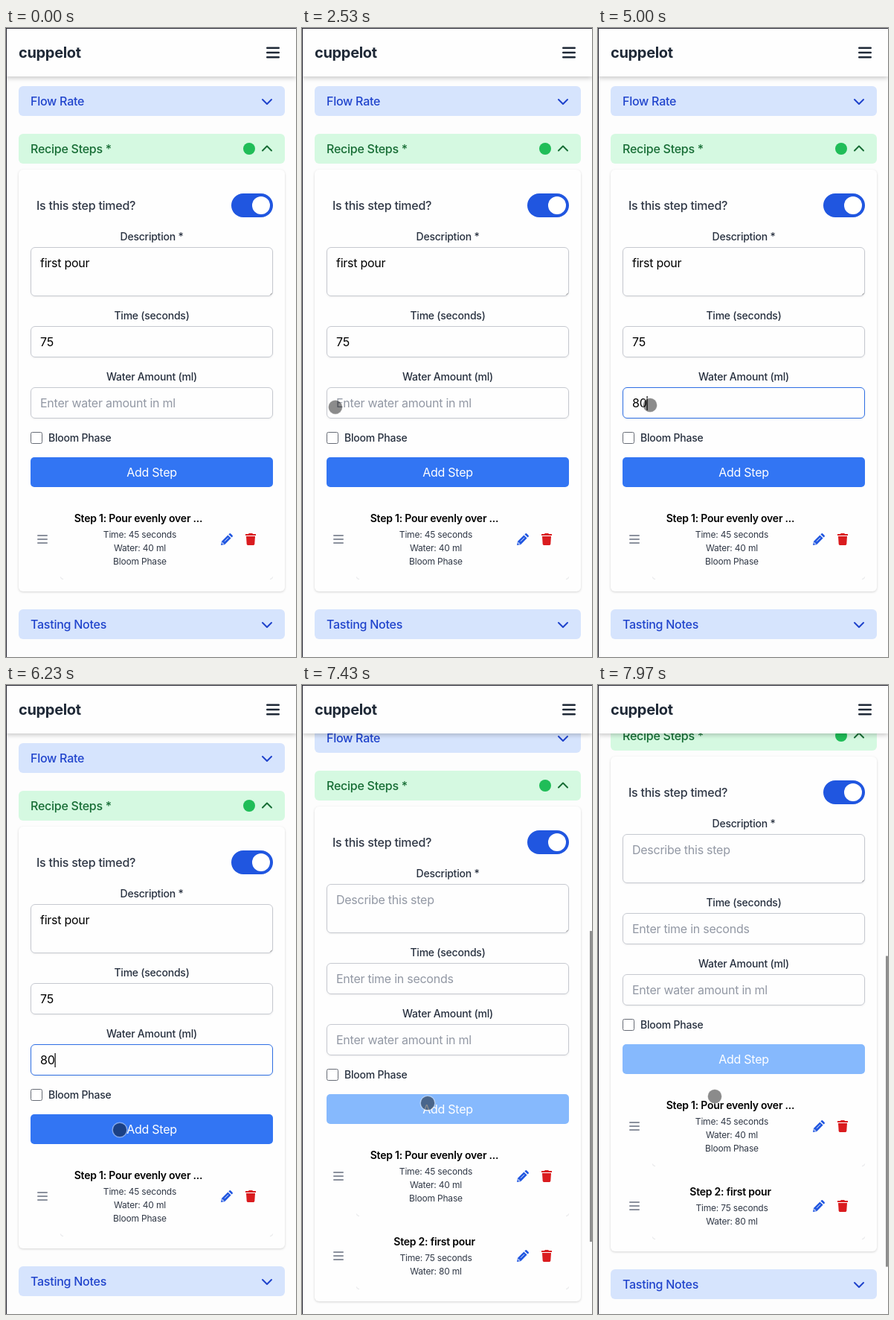
Animation, 390 px wide and 844 px high, one loop 8000 ms. Source, as an HTML page:

```html
<!DOCTYPE html>
<html lang="en">
<head>
<meta charset="utf-8">
<title>Recipe form</title>
<style>
  html, body { margin: 0; width: 100%; height: 100%; overflow: hidden; background: #fdfdfd; }
  svg { display: block; width: 390px; height: 844px; }
  text { font: 400 16px Inter, "Open Sans", sans-serif; letter-spacing: -.016em; fill: #000; white-space: pre; }
  .mid { text-anchor: middle; }
  .brand { font-size: 20px; font-weight: 700; fill: #1f2937; }
  .section { font-weight: 500; }
  .label { font-size: 14px; font-weight: 500; fill: #27303f; }
  .question { font-weight: 500; fill: #303846; }
  .title { font-size: 14px; font-weight: 600; }
  .detail { font-size: 12px; fill: #303846; }
  .hint { fill: #9298a4; }
  .stroke { fill: none; stroke-width: 2; stroke-linecap: round; stroke-linejoin: round; }
  .field { fill: #fefefe; stroke: #c6c9d0; filter: drop-shadow(0 1px 1px rgba(0,0,0,.06)); }
  .field.focus { stroke: #2f6fe4; }
  .card { fill: #fefefe; filter: drop-shadow(0 1px 1.5px rgba(0,0,0,.16)); }
  .header { fill: #fefefe; filter: drop-shadow(0 2px 3px rgba(0,0,0,.22)); }
</style>
</head>
<body>
<svg id="stage" viewBox="0 0 390 844"></svg>
<script>
const LOOP = 8000;
const FOCUS = 3400, TYPED = [4650, 4950], SUBMIT = 6450, SCROLL = 7150;

// Keyframes: time followed by values
const CURSOR = [[2300, -12, 520], [2500, 42, 509], [2800, 70, 506], [5350, 70, 506],
  [6050, 153, 597], [6800, 153, 597], [7150, 169, 561], [7430, 169, 561], [7700, 169, 558], [7970, 157, 552]];
const OFFSET = [[SCROLL, 0], [7430, 27], [7700, 52], [7970, 94], [8000, 99]];

const text = (x, y, cls, str, extra = '') => `<text x="${x}" y="${y}" class="${cls}" ${extra}>${str}</text>`;
const stroke = (d, color, extra = '') => `<path class="stroke" d="${d}" stroke="${color}" ${extra}/>`;
const box = (x, y, w, h, r, extra) => `<rect x="${x}" y="${y}" width="${w}" height="${h}" rx="${r}" ${extra}/>`;
const field = (y, h, id) => box(33.5, y + .5, 325, h - 1, 5.5, `class="field" id="${id}"`);

function section(y, name, bg, ink, open) {
  const chevron = open ? `M345 ${y + 22.5}l6-6 6 6` : `M345 ${y + 18}l6 6 6-6`;
  return box(17, y, 358, 40, 6, `fill="${bg}"`) + text(33, y + 26, 'section', name, `style="fill:${ink}"`) +
    stroke(chevron, ink) + (open ? `<circle cx="327" cy="${y + 20}" r="8" fill="#20bd58"/>` : '');
}

function step(y, iconY, bottom, title, details) {
  return text(178, y + 5, 'title mid', title) +
    details.map((d, i) => text(180, y + 26 + 18 * i, 'detail mid', d)).join('') +
    stroke(`M43 ${iconY - 5}h12m-12 5h12m-12 5h12`, '#8b919d', 'stroke-width="1.6"') +
    `<g transform="translate(289 ${iconY - 8})" fill="#2056e0">
      <path d="M1.1 10.7 9.4 2.4l4.2 4.2-8.3 8.3L0 16zM10.4 1.4l.9-.9q1-1 2 0l2.2 2.2q1 1 0 2l-.9.9z"/>
      <path d="M5 10.8l5-5M2 11.8v2.2h2.3" fill="none" stroke="#fff" stroke-width=".9"/></g>
    <g transform="translate(322 ${iconY - 8})" fill="#da1c1f">
      <path d="M0 1h4l.7-1h4.6l.7 1h4v2H0zM1 4h12l-.7 10.6q-.1 1.4-1.5 1.4H3.2q-1.4 0-1.5-1.4z"/></g>` +
    stroke(`M73.5 ${bottom - 3}q0 2.5 3 2.5M358.5 ${bottom - 3}q0 2.5-3 2.5`, '#e3e4e7', 'style="stroke-width:1"');
}

document.getElementById('stage').innerHTML = `
  <rect width="390" height="844" fill="#fdfdfd"/>
  <g id="page">
    ${section(78, 'Flow Rate', '#d6e4fd', '#2044cc')}
    ${section(142, 'Recipe Steps *', '#d5f9e1', '#176d35', true)}
    ${box(17, 190, 358, 566, 6, 'class="card" id="card"')}
    ${text(41, 244, 'question', 'Is this step timed?')}
    ${box(303, 222, 56, 32, 16, 'fill="#2056e0"')}<circle cx="343" cy="238" r="12" fill="#fff"/>
    ${text(196, 285, 'label mid', 'Description *')}
    ${field(294, 66, 'descriptionBox')}${text(46, 321, '', '', 'id="description"')}
    ${stroke('M355.5 358l2-2', '#777', 'style="stroke-width:.8"')}
    ${text(196, 391, 'label mid', 'Time (seconds)')}
    ${field(400, 42, 'secondsBox')}${text(46, 427, '', '', 'id="seconds"')}
    ${text(196, 473, 'label mid', 'Water Amount (ml)')}
    ${field(482, 42, 'waterBox')}${text(46, 509, '', '', 'id="water"')}
    <rect id="caret" y="494" width="1.2" height="19"/>
    ${box(33.5, 542.5, 15, 15, 2, 'fill="#fff" stroke="#666b75"')}
    ${text(57, 555, 'label', 'Bloom Phase')}
    ${box(33, 576, 326, 40, 5, 'id="button"')}
    ${text(196, 602, 'mid', 'Add Step', 'style="fill:#fff"')}
    ${step(658, 686, 740, 'Step 1: Pour evenly over ...', ['Time: 45 seconds', 'Water: 40 ml', 'Bloom Phase'])}
    <g id="added">${step(774, 793, 838, 'Step 2: first pour', ['Time: 75 seconds', 'Water: 80 ml'])}</g>
    <g id="notes">${section(780, 'Tasting Notes', '#d6e4fd', '#2044cc')}</g>
  </g>
  <rect class="header" width="390" height="65"/>
  ${text(17, 40, 'brand', 'cuppelot')}
  ${stroke('M351.2 26.8h15.6m-15.6 6.2h15.6m-15.6 6.2h15.6', '#1f2937', 'style="stroke-width:2.4"')}
  <rect id="thumb" x="387" width="3" height="417" fill="#8e8e8e"/>
  <path d="M0 .5H390M.5 0V844" stroke="#272733"/>
  <g id="cursor"><circle r="9.5" fill="#000" fill-opacity=".45"/>
    <circle r="9.8" fill="none" stroke="#fff" stroke-opacity=".4" stroke-width="1.5"/></g>`;

const el = id => document.getElementById(id);
const show = (id, on) => el(id).style.display = on ? '' : 'none';

function at(keys, t) {
  if (t <= keys[0][0]) return keys[0].slice(1);
  const i = keys.findIndex(k => k[0] > t);
  if (i < 0) return keys[keys.length - 1].slice(1);
  const [t0, ...from] = keys[i - 1], [t1, ...to] = keys[i];
  return from.map((v, j) => v + (to[j] - v) * (t - t0) / (t1 - t0));
}

function fill(id, value, hint) {
  el(id).textContent = value || hint;
  el(id).setAttribute('class', value ? '' : 'hint');
}

function draw(t) {
  const done = t >= SUBMIT, focused = t >= FOCUS && !done;
  const typed = '80'.slice(0, TYPED.filter(k => t >= k).length);
  fill('description', done ? '' : 'first pour', 'Describe this step');
  fill('seconds', done ? '' : '75', 'Enter time in seconds');
  fill('water', done ? '' : typed, 'Enter water amount in ml');
  el('waterBox').classList.toggle('focus', focused);

  const lastInput = [FOCUS, ...TYPED].filter(k => t >= k).pop();
  show('caret', focused && (t - lastInput) % 1000 < 500);
  el('caret').setAttribute('x', 46 + (typed ? el('water').getComputedTextLength() : 0));

  const fade = Math.min(1, Math.max(0, (t - SUBMIT) / 150));
  const mix = (a, b) => a + (b - a) * fade;
  el('button').setAttribute('fill', `rgb(${mix(50, 134)},${mix(117, 185)},${mix(243, 253)})`);
  show('added', done);
  el('card').setAttribute('height', done ? 664 : 566);
  el('notes').setAttribute('transform', `translate(0 ${done ? 98 : 0})`);

  const [offset] = at(OFFSET, t);
  el('page').setAttribute('transform', `translate(0 ${-Math.round(offset)})`);
  show('thumb', t >= SCROLL);
  el('thumb').setAttribute('y', 316.5 + offset / 2);
  el('cursor').setAttribute('transform', `translate(${at(CURSOR, t)})`);
}

function frame() {
  draw(performance.now() % LOOP);
  requestAnimationFrame(frame);
}
frame();
</script>
</body>
</html>
```
